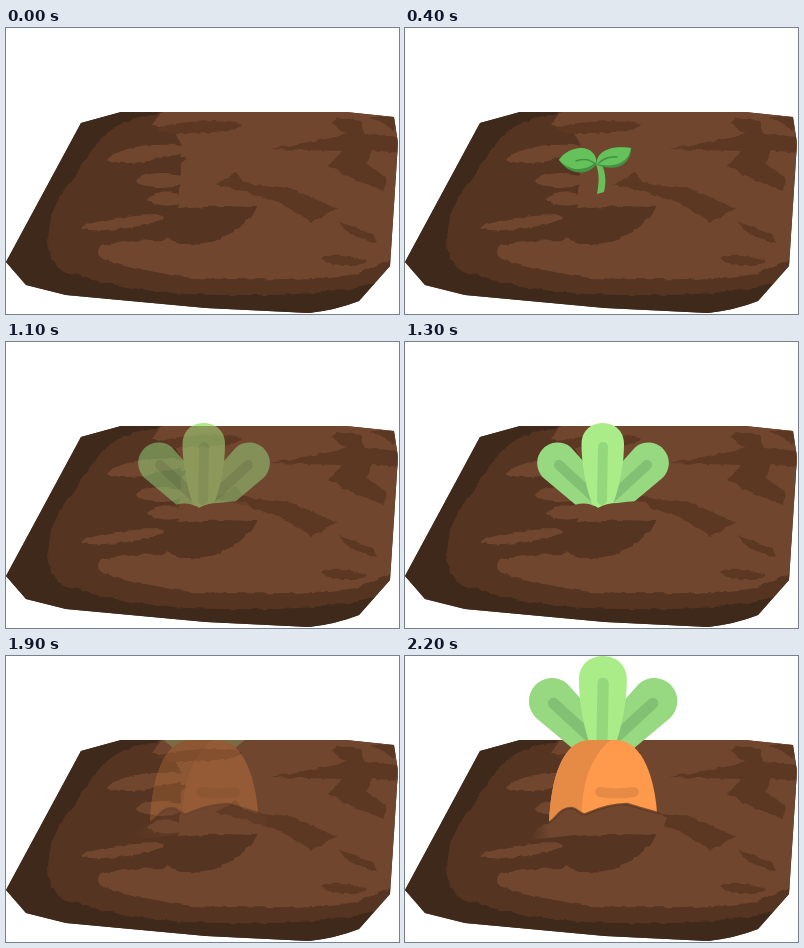
These frames come from a looping animation (393 px wide and 286 px high, 2700 ms). An HTML page:

```html
<!DOCTYPE html>
<html lang="en">
<head>
<meta charset="utf-8">
<title>Growing carrot</title>
<style>
html, body { margin: 0; width: 100%; height: 100%; overflow: hidden; background: #fff; }
svg { display: block; width: 100vw; height: 100vh; }
.line { fill: none; stroke-linecap: round; }
</style>
</head>
<body>
<svg viewBox="0 0 393 286">
  <defs>
    <clipPath id="sky"><rect width="393" height="84"/></clipPath>
    <clipPath id="ground"><rect y="84" width="393" height="202"/></clipPath>
    <clipPath id="slab"><path shape-rendering="crispEdges" d="M75 95L115 84H340L388 89L392 115L384 238L353 273Q330 282 303 285L200 280L60 267L20 257L0 234Z"/></clipPath>
    <clipPath id="root"><path d="M144 166C146 125 156 84 186 84H212C239 85 250 126 252 157L200 170Z"/></clipPath>
    <filter id="rough" x="0" y="0" width="1" height="1" color-interpolation-filters="sRGB">
      <feTurbulence type="fractalNoise" baseFrequency=".09" numOctaves="2" seed="4"/>
      <feDisplacementMap in="SourceGraphic" scale="5" xChannelSelector="R" yChannelSelector="G"/>
    </filter>
    <linearGradient id="moundFill">
      <stop offset="0" stop-color="#71462f" stop-opacity="0"/>
      <stop offset=".16" stop-color="#71462f"/>
    </linearGradient>

    <g id="sprout">
      <path fill="#6abf5b" d="M192 166L199 164C202 152 200 142 196 135L190 134C195 145 194 155 192 166Z"/>
      <path fill="#429443" d="M154 132C162 121 180 116 188 126C192 131 193 136 190 138C181 148 164 147 154 132ZM226 120C206 117 191 124 192 137C206 143 226 140 226 120Z"/>
      <path fill="#65c25a" d="M154 132C160 121 180 115 188 125C192 130 192 134 190 135C180 143 165 144 154 132ZM226 120C205 117 191 124 192 136C206 140 224 136 226 120Z"/>
      <path class="line" stroke="#429443" stroke-width="1.5" d="M171 133Q183 129 190 136M194 135Q201 128 212 129"/>
    </g>

    <g id="side">
      <path fill="#96d980" d="M172 164L138.300 135.700A20.500 20.500 0 0 1 166 105.500L188 130L193 164Z"/>
      <path class="line" stroke="#82c073" stroke-width="10" d="M154 123L192 158"/>
    </g>
    <g id="tops">
      <use href="#side"/>
      <use href="#side" transform="matrix(-1 0 0 1 396 0)"/>
      <path fill="#aaec87" d="M176.500 102C176.500 74 219 74 219 102C219 120 215.500 142 208 162L193 166L187 162C180 142 176.500 120 176.500 102Z"/>
      <path class="line" stroke="#94d87e" stroke-width="10" d="M198 105L197 158"/>
    </g>

    <g id="leaves">
      <use href="#tops"/>
      <path fill="#71462f" d="M160 166Q174 160 184 162Q190 164 193 166Q201 161 213 161Q229 158 241 160L247 168Q225 176 190 174Q170 172 160 166Z"/>
    </g>

    <path id="rim" d="M143 167C152 163 154 152 166 152C173 152 175 160 181 158Q203 148 222 148Q238 153 253 157"/>
    <g id="carrot">
      <use href="#tops" transform="matrix(1.127 0 0 1.127 -25 -91.300)"/>
      <g clip-path="url(#root)">
        <path fill="#ff994b" d="M140 80H260V170H140Z"/>
        <path fill="#e68b46" d="M140 80H212C188 94 175 125 177 170H140Z"/>
        <path class="line" stroke="#e68b46" stroke-width="10" d="M195 136Q212 139 229 136"/>
      </g>
      <path fill="url(#moundFill)" d="M124 184Q132 170 143 167C152 163 154 152 166 152C173 152 175 160 181 158Q203 148 222 148Q238 153 253 157L262 162L256 177L180 178Z"/>
      <use href="#rim" class="line" stroke="#553421" stroke-width="2.500" stroke-opacity=".7"/>
    </g>
  </defs>
  <g clip-path="url(#slab)">
    <rect width="393" height="286" fill="#3f291b"/>
    <g id="soil" filter="url(#rough)">
      <rect width="393" height="286" fill="#3f291b"/>
      <path fill="#553421" d="M157 80L150 87Q118 88 101 106Q86 118 70 147Q44 178 43 202Q38 234 60 244Q110 261 180 266Q320 271 370 255L400 225V80Z"/>
      <path fill="#71462f" d="M158 80L146 97Q172 99 176 120L172 178L160 212Q120 212 95 218Q88 226 97 231Q140 244 185 250Q300 254 350 246L400 225V80Z"/>
    </g>
  </g>
  <g id="plants"></g>
</svg>
<script>
const LOOP = 2700, STEP = 100;
const NS = 'http://www.w3.org/2000/svg';
const MID = '#553421', LIGHT = '#71462f', PATCH = '#5c3823';
const $ = id => document.getElementById(id);

function add(parent, tag, attrs) {
  const el = document.createElementNS(NS, tag);
  for (const k in attrs) el.setAttribute(k, attrs[k]);
  return parent.appendChild(el);
}

// Lens-shaped streak of soil from one end to the other
function streak(fill, x1, y1, x2, y2, width) {
  const dx = x2 - x1, dy = y2 - y1;
  const k = width / 1.5 / Math.hypot(dx, dy);
  const at = (f, side) => [x1 + dx * f - dy * k * side, y1 + dy * f + dx * k * side];
  const d = `M${x1} ${y1}C${at(.1, 1)} ${at(.8, 1)} ${x2} ${y2}C${at(.8, -1)} ${at(.1, -1)} ${x1} ${y1}Z`;
  add($('soil'), 'path', { d, fill });
}

const clod = (fill, d) => add($('soil'), 'path', { d, fill });

streak(LIGHT, 102, 131, 184, 119, 16);
streak(LIGHT, 75, 200, 166, 189, 11);
streak(MID, 125, 147, 180, 130, 15);
streak(LIGHT, 130, 153, 184, 152, 15);
streak(LIGHT, 142, 171, 184, 171, 13);
streak(PATCH, 150, 102, 238, 97, 12);
clod(MID, 'M158 182L215 178L250 179Q248 196 205 215Q180 220 158 209Z');

clod(PATCH, 'M208 157L230 144L238 155L285 160L331 181L306 194L280 178L245 165Z');
clod(PATCH, 'M264 121L330 109L340 105L325 96L330 90L356 93L358 106L392 109V125L366 122L360 134L380 150L378 163L345 150L323 138L336 123Z');
clod(PATCH, 'M364 89H392L388 102Z');
clod(PATCH, 'M334 194L367 206L371 215L345 207Z');
streak(PATCH, 314, 231, 361, 234, 9);

// Each plant fades in by quarters, then drops out after one step
const STAGES = [['sprout', 100, 900], ['leaves', 1000, 1800], ['carrot', 1900, LOOP]];

function alpha(t, start, end) {
  if (t < start || t >= end + STEP) return 0;
  if (t >= end) return .75;
  return Math.min(1, (Math.floor((t - start) / STEP) + 1) / 4);
}

const plants = STAGES.map(([id, start, end]) => {
  const part = clip => add(add($('plants'), 'g', { 'clip-path': `url(#${clip})` }), 'use', { href: '#' + id });
  return { start, end, sky: part('sky'), ground: part('ground') };
});

function draw(t) {
  for (const { start, end, sky, ground } of plants) {
    const a = alpha(t, start, end);
    ground.setAttribute('opacity', a);
    sky.setAttribute('opacity', a >= .5 ? 1 : 0); // hard-edged above the soil
  }
}

function tick() {
  draw(performance.now() % LOOP);
  requestAnimationFrame(tick);
}
tick();
</script>
</body>
</html>
```
